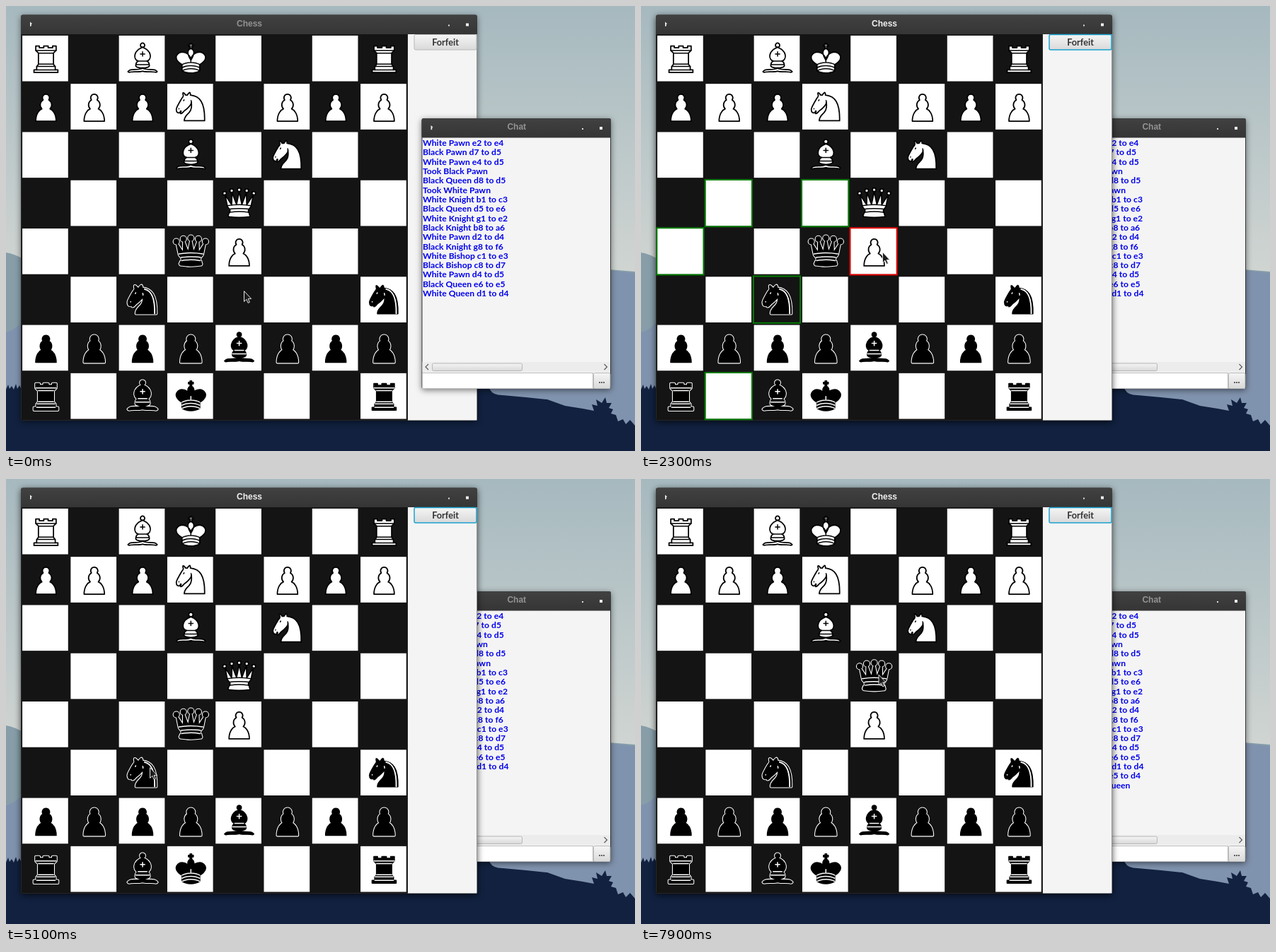
Animation, 889 px wide and 630 px high, one loop 8000 ms. Source, as an HTML page:

```html
<!DOCTYPE html>
<html lang="en">
<head>
<meta charset="utf-8">
<title>Chess</title>
<style>
html, body { margin: 0; width: 100%; height: 100%; overflow: hidden; background: #11213f; }
svg { position: absolute; left: 0; top: 0; width: 889px; height: 630px; }
#chat { z-index: 2; }
#chess { z-index: 1; }
#pointer { z-index: 4; }
.raised#chess { z-index: 3; }
.frame { fill: #383838; filter: drop-shadow(0 2px 4px rgba(0,0,0,.5)); }
.focused .frame { filter: drop-shadow(0 2px 5px rgba(0,0,0,.68)); }
.title { font: bold 12px "Liberation Sans", Arial, sans-serif; fill: #929292; text-anchor: middle; }
.focused .title { fill: #f0f0f0; }
.label { font: bold 12.7px Lato, sans-serif; fill: #333; text-anchor: middle; }
.log { font: bold 12.2px Lato, sans-serif; fill: #0000ee; white-space: pre; }
.button { fill: url(#shade); stroke: #b9b9b9; }
.focused .button { stroke: #1aa3d0; stroke-width: 1.5; }
.piece { stroke-linejoin: round; stroke-linecap: round; }
.mark { fill: none; stroke-width: 1.9; }
</style>
</head>
<body>
<svg viewBox="0 0 889 630">
  <defs>
    <linearGradient id="sky" x2="0" y2="1">
      <stop offset="0" stop-color="#a6b9bf"/>
      <stop offset="1" stop-color="#d0d5d2"/>
    </linearGradient>
    <linearGradient id="shade" x2="0" y2="1">
      <stop offset="0" stop-color="#f5f5f5"/>
      <stop offset="1" stop-color="#d9d9d9"/>
    </linearGradient>
    <linearGradient id="bar" x2="0" y2="1">
      <stop offset="0" stop-color="#414141"/>
      <stop offset="1" stop-color="#353535"/>
    </linearGradient>
  </defs>
  <rect width="889" height="380" fill="url(#sky)"/>
  <path fill="#879ea9" d="M0 349Q12 351 24 358L300 420L640 400L840 372L889 376V630H0z"/>
  <path fill="#8093ae" d="M0 462Q14 458 24 446L400 480L700 400L852 374L889 378V630H0z"/>
  <path fill="#11213f" d="M0 543l3-7 2 6 3-4 3 5 3-8 2 7 3-5 3 6L400 530H676L684 543Q688 551 702 551L735 554 765 557 790 566 815 570 831 573 828 564 836 566 834 557 842 562 847 554 849 562 856 562 852 569 858 571 855 577 862 579 865 588 872 585 876 592 882 586 889 594V630H0z"/>
</svg>

<svg id="chat" viewBox="0 0 889 630"></svg>
<svg id="chess" viewBox="0 0 889 630"></svg>
<svg id="pointer" viewBox="0 0 889 630">
  <path id="arrow" fill="#1b1b1b" stroke="#e4e4e4" d="M.5.6v14.9l3.4-3.2 2.2 5.1 2.3-1-2.2-5h4.4z"/>
</svg>

<script>
const $ = id => document.getElementById(id);
const PITCH = 68.28, LEFT = 21.3, TOP = 40.1;
const cellX = c => LEFT + c * PITCH;
const cellY = r => TOP + r * PITCH;

const rect = (x, y, w, h, attrs) =>
  `<rect x="${x}" y="${y}" width="${w}" height="${h}" ${attrs}/>`;

const ball = (x, y, r) => `M${x - r} ${y}a${r} ${r} 0 1 0 ${2 * r} 0a${r} ${r} 0 1 0 ${-2 * r} 0z`;
const crown = r => [[6, 12], [14, 9], [22.5, 8], [31, 9], [39, 12]].map(([x, y]) => ball(x, y, r)).join('');

// Each kind: body outline, then inner lines, on a 45 unit square
const SHAPES = {
  p: ['M22.5 9a4 4 0 0 0-3.2 6.4 6.5 6.5 0 0 0-1.4 10.2C15 26.6 11 31 11 39.5h23c0-8.5-4-12.9-6.9-13.9a6.5 6.5 0 0 0-1.4-10.2A4 4 0 0 0 22.5 9z', ''],
  r: ['M9 39v-3h3v-4h.5l1.5-2.5V17l-3-3V9h4v2h5V9h5v2h5V9h4v5l-3 3v12.5l1.5 2.5h.5v4h3v3z',
    'M12 36h21M12.5 32h20M14 29.5h17M14 17h17M11 14h23'],
  b: ['M9 36c3.4-1 10.1.4 13.5-2 3.4 2.4 10.1 1 13.5 2 0 0 1.6.5 3 2-.7 1-1.6 1-3 .5-3.4-1-10.1.5-13.5-1-3.4 1.5-10.1 0-13.5 1-1.4.5-2.3.5-3-.5 1.4-1.5 3-2 3-2z'
    + 'M15 32c2.5 2.5 12.5 2.5 15 0 .5-1.5 0-2 0-2 0-2.5-2.5-4-2.5-4 5.5-1.5 6-11.5-5-15.5-11 4-10.5 14-5 15.5 0 0-2.5 1.5-2.5 4 0 0-.5.5 0 2z' + ball(22.5, 8, 2.4),
    'M17.5 26h10M15 30h15M22.5 15.5v5M20 18h5'],
  n: ['M22 10c10.5 1 16.5 8 16 29H15c0-9 10-6.5 8-21 .4 2.9-4.6 7.4-7 9-3 2-2.8 4.3-5 4-1-1 1.4-3 0-3-1 0 .2 1.2-1 2-1 0-4 1-4-4 0-2 6-12 6-12s1.9-1.9 2-3.5c-.7-1-.5-2-.5-3 1-1 3 2.5 3 2.5h2s.8-2 2.5-3c1 0 1 3 1 3z',
    'M9 25.3v.4M14.3 16.3l.5-1M23 18q.1-1-.3-2'],
  q: ['M9 26L6.5 13.5 14 25l.3-14.1 5.2 13.6 3-14.5 3 14.5 5.2-13.6L31 25l7.5-11.5L36 26c0 2-1.5 2-2.5 4-1 1.5-1 1-.5 3.5 1.5 1 1 2.5 1 2.5 1.5 1.5 0 2.5 0 2.5-6.5 1-16.5 1-23 0 0 0-2-1-.5-2.5 0 0 0-1.5 1.5-2.5.5-2.5.5-2-.5-3.5-1-2-2.5-2-2.5-4z',
    'M9 26c8.5-1.5 18.5-1.5 27 0M11.5 30c3.5-1 18.5-1 22 0M12 33.5c6-1 15-1 21 0'],
  k: ['M21.6 12V9.2h-1.8V7.6h1.8V6.1h1.8v1.5h1.8v1.6h-1.8V12z'
    + 'M12.5 37c5.5 3.5 14.5 3.5 20 0v-7s9-4.5 6-10.5c-4-6.5-13.5-3.5-16 4-2.5-7.5-12-10.5-16-4-3 6 6 10.5 6 10.5z'
    + 'M22.5 25s4.5-7.5 3-10.5c0 0-1-2.5-3-2.5s-3 2.5-3 2.5c-1.5 3 3 10.5 3 10.5z',
    'M22.5 23.5V27M12.5 30c5.5-3 14.5-3 20 0M12.5 33.5c5.5-3 14.5-3 20 0M12.5 37c5.5-3 14.5-3 20 0']
};

function piece(code, c, r, id = '') {
  const kind = code.toLowerCase(), white = code !== kind;
  let [body, lines] = SHAPES[kind];
  if (kind === 'q') body += crown(white ? 2 : 2.5);
  const [fill, ink] = white ? ['#fff', '#000'] : ['#000', '#fff'];
  const halo = white ? '' : `<path d="${body}" stroke="#fff" stroke-width="3.1"/>`;
  const mane = !white && kind === 'n'
    ? '<path d="M24.8 11.2c7.5 1.5 11.8 9 11.4 27.6" fill="none" stroke="#fff" stroke-width="1.5"/>' : '';
  const x = cellX(c) + PITCH / 2 - 27.1, y = cellY(r) + 5.3;
  return `<g class="piece" ${id && `id="${id}"`} transform="translate(${x} ${y}) scale(1.25)">${halo}
    <path d="${body}" fill="${fill}" stroke="#000" stroke-width="1.4"/>
    <path d="${lines}" fill="none" stroke="${ink}" stroke-width="1.2"/>${mane}</g>`;
}

function marks(id, green, red) {
  const draw = (list, color) => list.split(' ').map(([c, r]) =>
    rect(cellX(c) + 1, cellY(r) + 1, PITCH - 2, PITCH - 2, `class="mark" stroke="${color}"`)).join('');
  return `<g id="${id}">${draw(green, '#008000')}${draw(red, '#f00000')}</g>`;
}

function frame(x, y, w, h, name) {
  const r = x + w;
  return rect(x, y, w, h, 'class="frame" rx="3"')
    + rect(x, y, w, 28, 'fill="url(#bar)" rx="3"')
    + `<text class="title" x="${x + w / 2 + .5}" y="${y + 16}">${name}</text>`
    + `<path fill="#eee" d="M${x + 13} ${y + 10}l3 2.5-1.5 1 .5 2-2 1z"/>`
    + rect(r - 41, y + 14, 2, 2, 'fill="#ddd"') + rect(r - 16, y + 12, 4, 4, 'fill="#eee"');
}

const LOG = `White Pawn e2 to e4
Black Pawn d7 to d5
White Pawn e4 to d5
Took Black Pawn
Black Queen d8 to d5
Took White Pawn
White Knight b1 to c3
Black Queen d5 to e6
White Knight g1 to e2
Black Knight b8 to a6
White Pawn d2 to d4
Black Knight g8 to f6
White Bishop c1 to e3
Black Bishop c8 to d7
White Pawn d4 to d5
Black Queen e6 to e5
White Queen d1 to d4
Black Queen e5 to d4
Took White Queen`.split('\n');

const logLine = (s, i) => `<text class="log" x="589" y="${198 + i * 13.32}">${s}</text>`;

$('chat').innerHTML = frame(587.5, 159, 267.5, 383, 'Chat')
  + rect(588.5, 186.5, 265.5, 355, 'fill="#f4f4f4"')
  + LOG.slice(0, 17).map(logLine).join('')
  + `<g id="newLines">${LOG.slice(17).map((s, i) => logLine(s, i + 17)).join('')}</g>`
  + rect(588.5, 504, 265.5, 14, 'fill="#ececec"')
  + '<path d="M597 507l-4 4 4 4M845.500 507l4 4-4 4" fill="none" stroke="#555" stroke-width="1.1"/>'
  + rect(602.5, 506, 127, 10.5, 'rx="2" fill="url(#shade)" stroke="#b7b7b7"')
  + rect(588.5, 519.5, 241, 22, 'fill="#fff" stroke="#bdbdbd"')
  + rect(830.5, 519.5, 23.5, 22, 'rx="2" fill="url(#shade)" stroke="#b9b9b9"')
  + '<text class="label" x="842" y="534">...</text>';

const ROWS = ['R.BK...R', 'PPPN.PPP', '...B.N..', '........', '....P...', '..n....n', 'ppppbppp', 'r.bk...r'];
let squares = '', men = '';
ROWS.forEach((row, r) => [...row].forEach((code, c) => {
  if ((r + c) % 2 === 0) squares += rect(cellX(c) + 1.8, cellY(r) + 1.8, PITCH - 3.6, PITCH - 3.6, 'fill="#fff"');
  if (code !== '.') men += piece(code, c, r);
}));

$('chess').innerHTML = frame(21, 12.5, 645, 574.5, 'Chess')
  + rect(21.5, 40, 546, 546.5, 'fill="#141414"')
  + rect(568, 40, 97.5, 546.5, 'fill="#f4f4f4"')
  + rect(577, 40.5, 88, 21.5, 'class="button" rx="2"')
  + '<text class="label" x="621" y="55.500">Forfeit</text>'
  + squares
  + marks('knightMoves', '13 33 04 25 17', '44')
  + marks('queenMoves', '12 23 33 04 14 24 34 35 45', '01 32 43 44')
  + men
  + piece('Q', 4, 3, 'whiteQueen') + piece('q', 3, 4, 'queenHome') + piece('q', 4, 3, 'queenTook');

// Pointer moves: start, steps of 100 ms, bend point, end point
const MOVES = [
  [200, 5, 262, 472, 193, 410],
  [2000, 4, 265, 376, 341, 348],
  [3700, 6, 290, 352, 205, 408.5],
  [4500, 2, 204, 408, 203, 408],
  [5200, 3, 225, 350, 285, 343],
  [5600, 2, 273, 342, 260.500, 344],
  [6500, 5, 298, 305, 335.500, 276.500]
];

function pointerAt(t) {
  let x = 336, y = 403;
  for (const [start, steps, bx, by, ex, ey] of MOVES) {
    if (t < start) break;
    const k = Math.min(1, (Math.floor((t - start) / 100) + 1) / steps);
    const u = k * k * (3 - 2 * k), v = 1 - u;
    x = v * v * x + 2 * u * v * bx + u * u * ex;
    y = v * v * y + 2 * u * v * by + u * u * ey;
  }
  return [x, y];
}

const show = (id, on) => { $(id).style.visibility = on ? 'visible' : 'hidden'; };
const begin = performance.now();

function draw() {
  const t = (performance.now() - begin) % 8000;
  const taken = t >= 7800;
  $('chess').classList.toggle('raised', t >= 800);
  $('chess').classList.toggle('focused', t >= 900);
  show('knightMoves', t >= 900 && t < 5100);
  show('queenMoves', t >= 6000 && !taken);
  show('whiteQueen', !taken);
  show('queenHome', !taken);
  show('queenTook', taken);
  show('newLines', t >= 7900);
  $('arrow').setAttribute('transform', `translate(${pointerAt(t)})`);
  requestAnimationFrame(draw);
}
draw();
</script>
</body>
</html>
```
